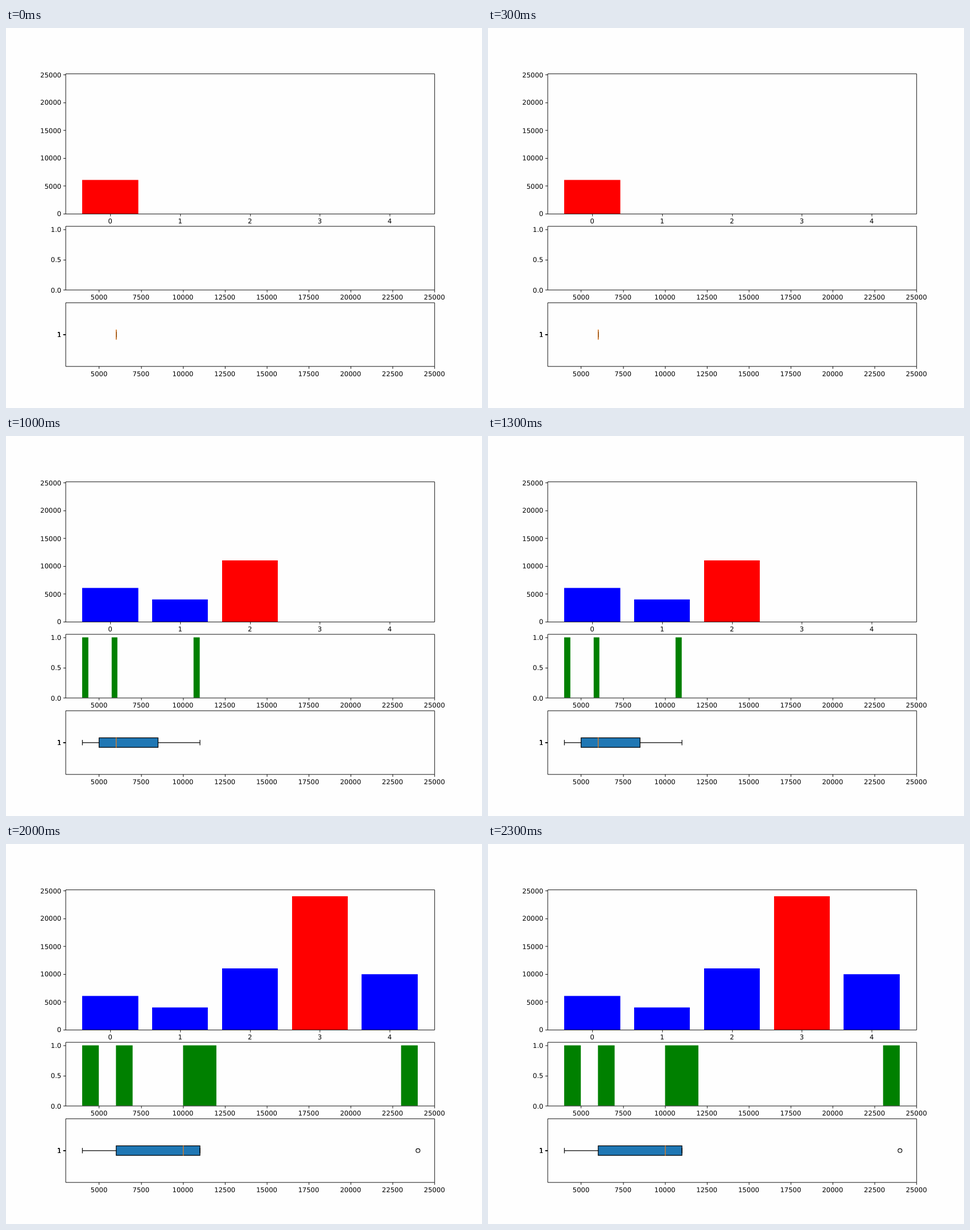
Recreate the animation shown at these times as an HTML page. Size 837 by 669 pixels, loop 2.5 s.

```html
<!DOCTYPE html>
<html lang="en">
<head>
<meta charset="utf-8">
<title>Growing sample</title>
<style>
html, body { margin: 0; width: 100%; height: 100%; overflow: hidden; background: #fefefe; }
svg { display: block; }
text { font: 13.889px "DejaVu Sans", sans-serif; fill: #000; text-rendering: geometricPrecision; }
path { fill: none; stroke: #000; }
#axes path { stroke-width: 1.11; }
.box path, .box circle { fill: none; stroke: #000; stroke-width: 1.39; stroke-linecap: square; }
.box .body { fill: #1f77b4; }
.box .median { stroke: #ff7f0e; }
</style>
</head>
<body>
<svg width="837" height="669" viewBox="0 0 1000 800" preserveAspectRatio="none">
  <g id="data"></g>
  <g id="axes"></g>
</svg>
<script>
const values = [6000, 4000, 11000, 24000, 10000];
const STEP = 500, BINS = 20;

// A 1000 by 800 sheet with four rows; the bar chart takes two of them.
const left = 125, right = 900, top0 = 96, bottom0 = 712;
const row = (bottom0 - top0) / 4.6;
const panel = (first, last) => ({ top: top0 + first * row * 1.2, bottom: top0 + last * row * 1.2 + row });
const bars = panel(0, 1), hist = panel(2, 2), box = panel(3, 3);
const midY = (box.top + box.bottom) / 2;

const barX = i => left + (i + 0.64) / 5.28 * (right - left);
const valX = v => left + (v - 3000) / 22000 * (right - left);
const barY = v => bars.bottom - v / 25200 * (bars.bottom - bars.top);
const histY = n => hist.bottom - n / 1.05 * (hist.bottom - hist.top);

// Fills end on whole units, lines run between them.
const edge = Math.round;
const mid = v => Math.round(v) + 0.5;

const outline = (x0, y0, x1, y1) => `M${x0} ${y0}H${x1}V${y1}H${x0}Z`;
const area = (x0, y0, x1, y1) => outline(edge(x0), edge(y0), edge(x1), edge(y1));
const fill = (d, color) => `<path d="${d}" style="fill:${color};stroke:none"/>`;
const path = (d, name = "") => `<path class="${name}" d="${d}"/>`;
const label = (x, y, str, anchor) =>
  `<text x="${x}" y="${Math.round(y)}" text-anchor="${anchor}">${str}</text>`;

const frame = p => path(outline(mid(left), mid(p.top), mid(right), mid(p.bottom)));

const xTick = (x, p, str) =>
  path(`M${mid(x)} ${mid(p.bottom)}v5`) + label(x, p.bottom + 20.7, str, "middle");

const yTick = (y, str) =>
  path(`M${mid(left)} ${mid(y)}h-5`) + label(116.2, y + 5.4, str, "end");

function drawAxes() {
  let s = frame(bars) + frame(hist) + frame(box);
  for (let v = 0; v <= 25000; v += 5000) s += yTick(barY(v), v);
  for (let i = 0; i < 5; i++) s += xTick(barX(i), bars, i);
  for (const n of [0, 0.5, 1]) s += yTick(histY(n), n.toFixed(1));
  for (let v = 5000; v <= 25000; v += 2500) {
    s += xTick(valX(v), hist, v) + xTick(valX(v), box, v);
  }
  // Overprinted label, so it looks heavier.
  return s + yTick(midY, "1").repeat(6);
}

function drawBars(list) {
  const max = Math.max(...list);
  return list.map((v, i) => fill(
    area(barX(i - 0.4), barY(v), barX(i + 0.4), bars.bottom),
    v === max ? "#f00" : "#00f")).join("");
}

function drawHist(sorted) {
  const lo = sorted[0], size = (sorted[sorted.length - 1] - lo) / BINS;
  if (!size) return "";
  const d = sorted.map(v => {
    const start = lo + size * Math.min(BINS - 1, Math.floor((v - lo) / size));
    return area(valX(start), histY(1), valX(start + size), hist.bottom);
  }).join("");
  return fill(d, "#008000");
}

function quantile(sorted, q) {
  const pos = q * (sorted.length - 1), i = Math.floor(pos);
  const next = sorted[Math.min(i + 1, sorted.length - 1)];
  return sorted[i] + (next - sorted[i]) * (pos - i);
}

function drawBox(sorted) {
  const [q1, q2, q3] = [0.25, 0.5, 0.75].map(q => quantile(sorted, q));
  const reach = 1.5 * (q3 - q1);
  const isInside = v => v >= q1 - reach && v <= q3 + reach;
  const inside = sorted.filter(isInside);
  const at = v => mid(valX(v));
  const y = mid(midY), half = 10;

  let s = path(outline(at(q1), y - half, at(q3), y + half), "body");
  for (const [side, end] of [[q1, inside[0]], [q3, inside[inside.length - 1]]]) {
    s += path(`M${at(side)} ${y}H${at(end)}M${at(end)} ${y - half / 2}v${half}`);
  }
  s += path(`M${at(q2)} ${y - half}v${2 * half}`, "median");
  for (const v of sorted) {
    if (!isInside(v)) s += `<circle cx="${at(v)}" cy="${y}" r="4.17"/>`;
  }
  return `<g class="box">${s}</g>`;
}

const layer = document.getElementById("data");
let shown = 0;

function render(ms) {
  const count = Math.floor(ms / STEP) % values.length + 1;
  if (count === shown) return;
  shown = count;
  const list = values.slice(0, count);
  const sorted = [...list].sort((a, b) => a - b);
  layer.innerHTML = drawBars(list) + drawHist(sorted) + drawBox(sorted);
}

document.getElementById("axes").innerHTML = drawAxes();
const begin = performance.now();
function tick() {
  render(performance.now() - begin);
  requestAnimationFrame(tick);
}
tick();
</script>
</body>
</html>
```
